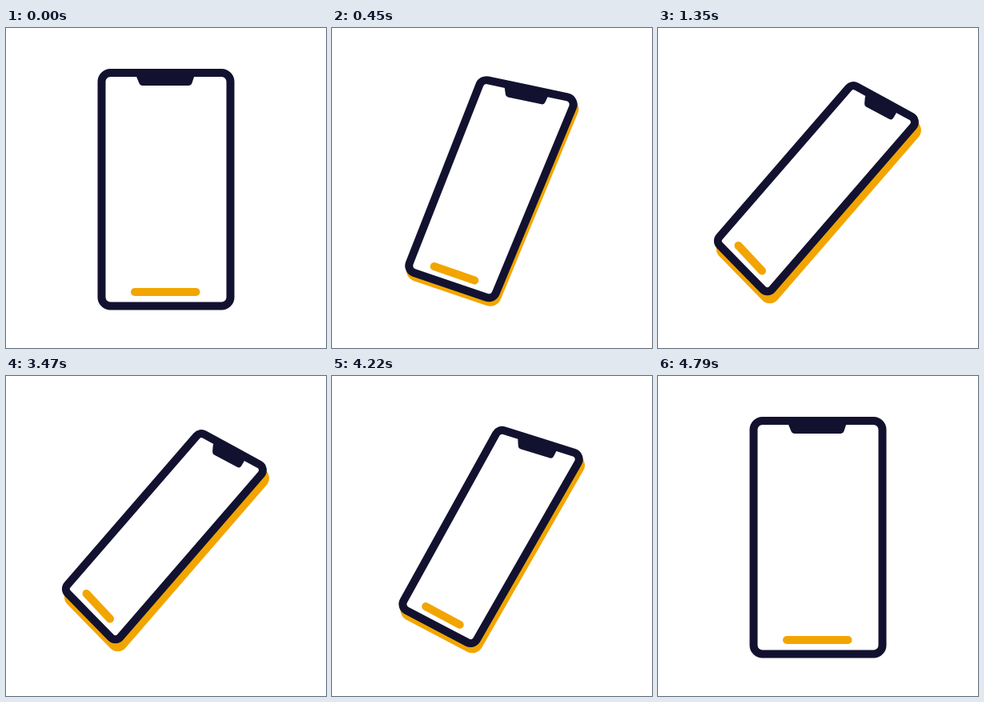
Animation of 400 by 400 pixels, one loop 5820 ms. Source, as an HTML page with a canvas:

```html
<!DOCTYPE html>
<html lang="en">
<head>
<meta charset="utf-8">
<title>Tilting phone</title>
<style>
  html, body { margin: 0; height: 100%; overflow: hidden; background: #fff; }
  canvas { display: block; width: 400px; height: 400px; }
</style>
</head>
<body>
<canvas width="400" height="400"></canvas>
<script>
const ctx = document.querySelector('canvas').getContext('2d');
const NAVY = '#121230', ORANGE = '#f2a500';
const LOOP = 5820, STEP = 30, WIND_UP = 150, TILTED = 1350, RETURN = 3440;
const DIP = 0.15; // how far the wind-up swings past the flat pose

// Points 0-3: body corners, 4-7: notch, 8-9: home bar ends.
const flat = [
  [119.5, 56], [280.5, 56], [280.5, 347.5], [119.5, 347.5],
  [164, 58], [234, 58], [230, 70], [169, 70],
  [161, 330], [237.5, 330]
];
const tilt = [
  [242.5, 70], [325.5, 115.5], [137, 333], [72, 266.5],
  [261, 84], [297, 104], [291.5, 113], [260, 96],
  [100.5, 272], [130, 303.5]
];
const windUp = flat.map(([x, y]) => {
  const angle = -0.084, scale = 1.067, dx = (x - 200) * scale, dy = (y - 201.5) * scale;
  const c = Math.cos(angle), s = Math.sin(angle);
  return [200 + dx * c - dy * s, 201.5 + dx * s + dy * c];
});

const clamp = (v, lo, hi) => Math.min(hi, Math.max(lo, v));
const mix = (a, b, k) => a + (b - a) * k;
const smooth = s => s * s * (3 - 2 * s);
const snap = t => Math.floor(t / STEP) * STEP;

// Sharp start and long settle: a Bezier timing curve solved by bisection.
function settle(u) {
  let lo = 0, hi = 1;
  for (let i = 0; i < 24; i++) {
    const s = (lo + hi) / 2, r = 1 - s;
    const x = 0.75 * s * r * r - 0.12 * s * s * r + s * s * s;
    if (x < u) lo = s; else hi = s;
  }
  return smooth(lo);
}

// 0 is flat, 1 is fully tilted, negative is the wind-up.
function tiltAt(time) {
  const t = clamp(time < 2400 ? snap(time) : TILTED - snap(time - RETURN), 0, TILTED);
  if (t === TILTED) return 1;
  return t < WIND_UP
    ? -DIP * smooth(t / WIND_UP)
    : mix(-DIP, 1, settle((t - WIND_UP) / (TILTED - WIND_UP)));
}

function roundedPath(points, radius) {
  const [a, b] = points;
  ctx.beginPath();
  ctx.moveTo((a[0] + b[0]) / 2, (a[1] + b[1]) / 2);
  for (let i = 1; i <= 4; i++) {
    ctx.arcTo(...points[i % 4], ...points[(i + 1) % 4], radius);
  }
  ctx.closePath();
}

function paint(stroke, width, fill) {
  ctx.lineWidth = width;
  ctx.strokeStyle = stroke;
  if (fill) {
    ctx.fillStyle = fill;
    ctx.fill();
  }
  ctx.stroke();
}

function draw(now) {
  const p = tiltAt(now % LOOP), depth = Math.max(p, 0);
  const goal = p < 0 ? windUp : tilt, k = p < 0 ? -p / DIP : p;
  const pose = flat.map(([x, y], i) => [mix(x, goal[i][0], k), mix(y, goal[i][1], k)]);
  const body = pose.slice(0, 4), radius = mix(11, 8, depth);

  ctx.fillStyle = '#fff';
  ctx.fillRect(0, 0, 400, 400);
  ctx.lineCap = ctx.lineJoin = 'round';

  if (depth > 0) {
    roundedPath(body.map(([x, y]) => [x + 3 * depth, y + 10 * depth]), radius);
    paint(ORANGE, 10, ORANGE);
  }
  roundedPath(body, radius);
  paint(NAVY, 10, '#fff');
  roundedPath(pose.slice(4, 8), 2);
  paint(NAVY, 4, NAVY);

  ctx.beginPath();
  ctx.moveTo(...pose[8]);
  ctx.lineTo(...pose[9]);
  paint(ORANGE, 10);
  requestAnimationFrame(draw);
}
draw(0);
</script>
</body>
</html>
```
